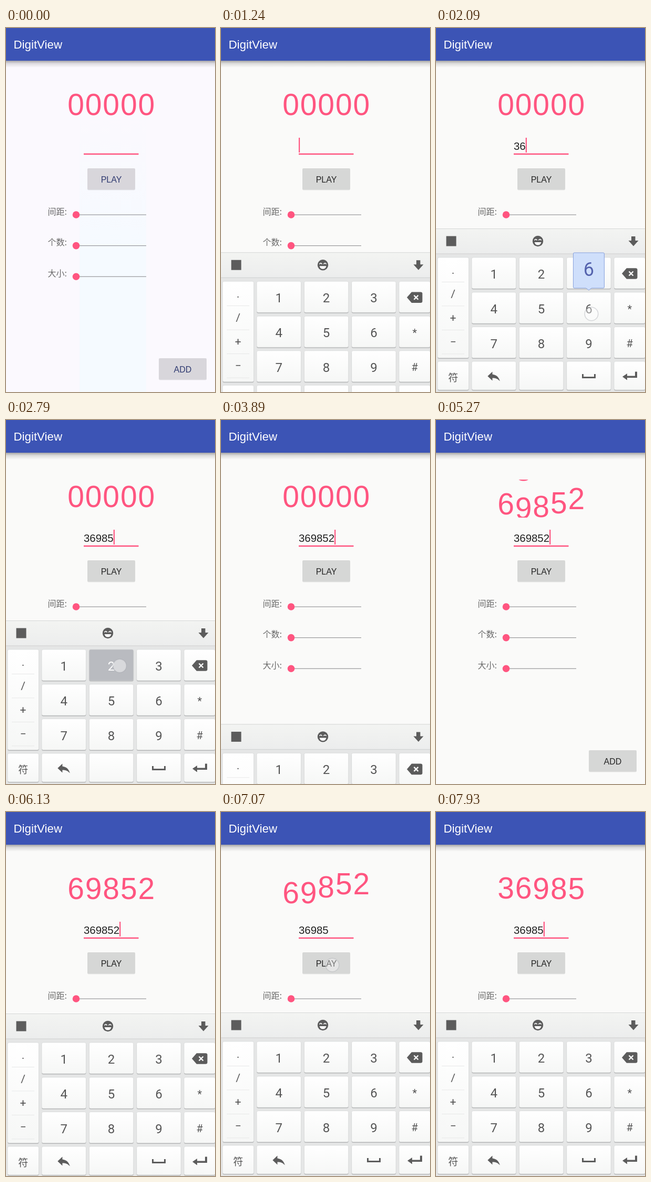
Recreate the animation shown at these times as an HTML page. Size 398 px wide and 690 px high, loop 8 s.

```html
<!DOCTYPE html>
<html lang="zh">
<head>
<meta charset="utf-8">
<title>DigitView</title>
<style>
html, body { margin: 0; width: 100%; height: 100%; overflow: hidden; background: #fafaf9; }
svg { display: block; width: 398px; height: 690px; }
text { font-family: "Liberation Sans", Arial, sans-serif; }
.mid { text-anchor: middle; }
.key text { font-family: Roboto, "Noto Sans CJK SC", "Noto Sans CJK", sans-serif; text-anchor: middle; fill: #555; }
.cjk { font: 16px "Noto Sans CJK SC", "Noto Sans CJK", sans-serif; fill: #686868; }
.btn rect { fill: #d6d7d6; }
.btn text { font-size: 16px; fill: #252525; }
.cool .btn rect { fill: #d8d6db; }
.cool .btn text { fill: #2f3a70; }
.key.down rect { fill: #b9bbc0; }
.key.down text { fill: #fff; }
</style>
</head>
<body>
<svg id="stage" viewBox="0 0 398 690" xmlns="http://www.w3.org/2000/svg">
  <defs>
    <linearGradient id="shade" x2="0" y2="1">
      <stop stop-color="#000" stop-opacity=".34"/>
      <stop offset=".4" stop-color="#000" stop-opacity=".12"/>
      <stop offset="1" stop-color="#000" stop-opacity="0"/>
    </linearGradient>
    <linearGradient id="band" x2="0" y2="1">
      <stop stop-color="#f5faff" stop-opacity="0"/>
      <stop offset=".5" stop-color="#f5faff"/>
    </linearGradient>
    <linearGradient id="cap" x2="0" y2="1">
      <stop stop-color="#fff"/><stop offset="1" stop-color="#f6f7f6"/>
    </linearGradient>
    <linearGradient id="bar" x2="0" y2="1">
      <stop stop-color="#f3f4f2"/><stop offset="1" stop-color="#eceded"/>
    </linearGradient>
    <clipPath id="window"><rect x="100" y="113" width="200" height="72"/></clipPath>
  </defs>
</svg>
<script>
const LOOP = 8000, ROW = 72, HOLD = 80, PINK = '#ff5580', INK = '#5c5c5c';
const stage = document.getElementById('stage');

function add(parent, tag, attrs = {}, text) {
  const node = document.createElementNS('http://www.w3.org/2000/svg', tag);
  for (const k in attrs) node.setAttribute(k, attrs[k]);
  if (text !== undefined) node.textContent = text;
  return parent.appendChild(node);
}
const box = (p, x, y, width, height, fill, more) => add(p, 'rect', { x, y, width, height, fill, ...more });
const label = (p, x, y, size, str, more) => add(p, 'text', { x, y, 'font-size': size, ...more }, str);
const show = (node, on) => node.setAttribute('opacity', +on);

// App screen
const back = box(stage, 0, 0, 398, 690, '#fafaf9');
const band = box(stage, 140, 165, 127, 525, 'url(#band)');
box(stage, 0, 62, 398, 13, 'url(#shade)');
box(stage, 0, 0, 398, 62, '#3c54b5');
label(stage, 14.5, 39, 22.3, 'DigitView', { fill: '#fff' });

const reels = add(stage, 'g', { 'clip-path': 'url(#window)', fill: PINK });
const columns = Array.from({ length: 5 }, (_, i) => {
  const g = add(reels, 'g');
  for (let d = 0; d < 10; d++)
    label(g, 133 + 33.6 * i, 164.5 + ROW * d, 57, d, { class: 'mid' });
  return g;
});

const field = label(stage, 148, 230.5, 20.4, '', { fill: '#222' });
const caret = box(stage, 0, 208, 2.2, 28, PINK);
box(stage, 148, 237.7, 104.5, 2.5, PINK);

function button(x, y, str) {
  const g = add(stage, 'g', { class: 'btn' });
  box(g, x, y + 1, 91, 40.5, '', { rx: 2, style: 'fill:#000;opacity:.08' });
  box(g, x, y, 91, 40.5, '', { rx: 2 });
  add(g, 'text', { x: x + 45.5, y: y + 26.5, class: 'mid' }, str);
}
button(155, 266, 'PLAY');
button(291, 626, 'ADD');

['间距:', '个数:', '大小:'].forEach((str, i) => {
  const y = 354 + 58.6 * i;
  add(stage, 'text', { x: 79.5, y: y - .5, class: 'cjk' }, str);
  box(stage, 134, y - .5, 133, 1.1, '#8f8f92');
  add(stage, 'circle', { cx: 133.5, cy: y, r: 6.8, fill: PINK });
});

// Keyboard
const board = add(stage, 'g');
box(board, 0, 380, 398, 310, '#e5e6e6');
box(board, 0, 380, 398, 48, 'url(#bar)');
box(board, 0, 380, 398, 1, '#d6d7d7');
box(board, 0, 427.5, 398, 1, '#cfd0d0');
box(board, 19.5, 394.5, 19, 19, INK);
add(board, 'circle', { cx: 194, cy: 404, r: 10.2, fill: INK });
add(board, 'path', { d: 'M187.5 402.5q2.5-4 5 0M195.500 402.5q2.500-4 5 0', fill: 'none', stroke: '#fff', 'stroke-width': 1.5 });
add(board, 'path', { d: 'M187.500 406h13q-1.500 5.500-6.500 5.500t-6.500-5.500z', fill: '#fff' });
add(board, 'path', { d: 'M372 395h7.500v8h6l-9.500 10.500-9.500-10.500h5.500z', fill: INK });

const keys = {};
const rowTop = [435, 501, 566.5, 632], colLeft = [3, 68, 158.3, 248.7, 339];
function key(name, col, row, str, size = 24, height = row === 3 ? 54 : 59) {
  const x = colLeft[col], y = rowTop[row], w = col % 4 ? 84.5 : 59.5;
  const g = add(board, 'g', { class: 'key' });
  box(board, x, y + 1.5, w, height, '#b4b5b6', { rx: 3 });
  board.appendChild(g);
  box(g, x, y, w, height, 'url(#cap)', { rx: 3, stroke: '#d2d3d3', 'stroke-width': .6 });
  const cx = x + w / 2;
  if (str) label(g, cx, y + 31.5 + size * .355, size, str);
  return keys[name] = { g, cx, top: y };
}
for (let d = 1; d < 10; d++) key(d, 1 + (d - 1) % 3, Math.floor((d - 1) / 3), d);
key(0, 2, 3, 0);

const signs = key('signs', 0, 0, '', 0, 190.5).g;
[['.', 466], ['/', 511], ['+', 556], ['−', 602]].forEach(([s, y], i) => {
  label(signs, 32.5, y, 21, s);
  box(signs, 11, 481 + 45.5 * i, 43, .8, '#e3e4e4');
});
key('sym', 0, 3, '符', 19);
key('star', 4, 1, '*', 20);
key('hash', 4, 2, '#', 20);

const icon = (name, col, row, d, more) => add(key(name, col, row).g, 'path', { d, fill: INK, ...more });
icon('back', 1, 3, 'M10 9V5l-7 7 7 7v-4.100c5 0 8.500 1.600 11 5.100-1-5-4-10-11-11z',
  { transform: 'translate(110 660) scale(1.3 1.2) translate(-12 -12)' });
icon('space', 3, 3, 'M279.500 656v6.500h23v-6.500', { fill: 'none', stroke: INK, 'stroke-width': 3 });
icon('enter', 4, 3, 'M355 661l9-6v4.500h15v-8h4v11.500h-19v4.500z');
icon('del', 4, 0, 'M354 465.500l9-10.300h17q3.500 0 3.500 3v14.600q0 3-3.500 3h-17z');
add(keys.del.g, 'path', { d: 'M367.500 461.500l8 8m0-8l-8 8', stroke: '#fff', 'stroke-width': 2.4 });

const popup = add(stage, 'g');
add(popup, 'path', { d: 'M-27.500-75h55q2 0 2 2v63q0 2-2 2h-22l-5.500 4-5.500-4h-22q-2 0-2-2v-63q0-2 2-2z', fill: '#cfdffb', stroke: '#86a0dc' });
const popupText = label(popup, 0, -31, 36, '', { class: 'mid', fill: '#5462ad', style: 'font-family:Roboto,sans-serif' });

const finger = add(stage, 'circle', { r: 12.8, fill: '#fff', 'fill-opacity': .45, stroke: '#a4a6ac', 'stroke-opacity': .45, 'stroke-width': 1.6 });

// Script: key, press time, finger offset from the key centre
const taps = [
  [3, 1630, 8, 6], [6, 2000, 5, 10], [9, 2240, 6, 6],
  [8, 2390, 8, 4], [5, 2540, 10, 4], [2, 2780, 16, 0], ['del', 6370, 2, 2]
];
const touches = [
  [1000, 1080, 205, 224], [4350, 4500, 219, 284], [5740, 5830, 205, 224], [6890, 7050, 212, 290],
  ...taps.map(([k, t, dx, dy]) => [t, t + HOLD, keys[k].cx + dx, keys[k].top + 31 + dy])
];
const slides = [[1080, 1420, 1], [3800, 4120, 0], [5830, 6200, 1]];
const rolls = [[4390, '00000', '69852'], [6945, '69852', '36985']];
const wakes = [160, 1080, ...taps.map(a => a[1] + HOLD), 5830].sort((a, b) => a - b);

const clamp = x => Math.min(1, Math.max(0, x));

function draw(t) {
  const cool = t < 1010;
  stage.setAttribute('class', cool ? 'cool' : '');
  back.setAttribute('fill', cool ? '#fbf9fe' : '#fafaf9');
  show(band, cool);

  const [start, from, to] = t < rolls[1][0] ? rolls[0] : rolls[1];
  const p = (1 - Math.cos(Math.PI * clamp((t - start) / 1000))) / 2;
  columns.forEach((g, i) => {
    const v = +from[i] + (to[i] - from[i]) * p;
    g.setAttribute('transform', `translate(0 ${-v * ROW})`);
  });

  let str = '', pop = null;
  for (const [k, at] of taps) {
    const age = t - at;
    keys[k].g.classList.toggle('down', age >= 0 && age < HOLD);
    if (age < HOLD) continue;
    str = k === 'del' ? str.slice(0, -1) : str + k;
    if (k !== 'del' && age < HOLD + 120) pop = k;
  }
  field.textContent = str;
  caret.setAttribute('x', 148 + str.length * 11.345);
  const woke = wakes.filter(w => w <= t).pop();
  show(caret, woke !== undefined && (t - woke) % 1000 < 500);

  show(popup, pop !== null);
  if (pop !== null) {
    popup.setAttribute('transform', `translate(${keys[pop].cx} ${keys[pop].top})`);
    popupText.textContent = pop;
  }

  let lift = 0;
  for (const [a, b, goal] of slides) {
    if (t < a) break;
    const e = 1 - (1 - clamp((t - a) / (b - a))) ** 3;
    lift = goal ? e : 1 - e;
  }
  board.setAttribute('transform', `translate(0 ${310 * (1 - lift)})`);

  const touch = touches.find(([a, b]) => t >= a && t < b + 110);
  show(finger, 0);
  if (touch) {
    const [, b, x, y] = touch;
    finger.setAttribute('cx', x);
    finger.setAttribute('cy', y);
    finger.setAttribute('opacity', 1 - clamp((t - b) / 110));
  }
}

const born = performance.now();
function tick() {
  draw((performance.now() - born) % LOOP);
  requestAnimationFrame(tick);
}
tick();
</script>
</body>
</html>
```
